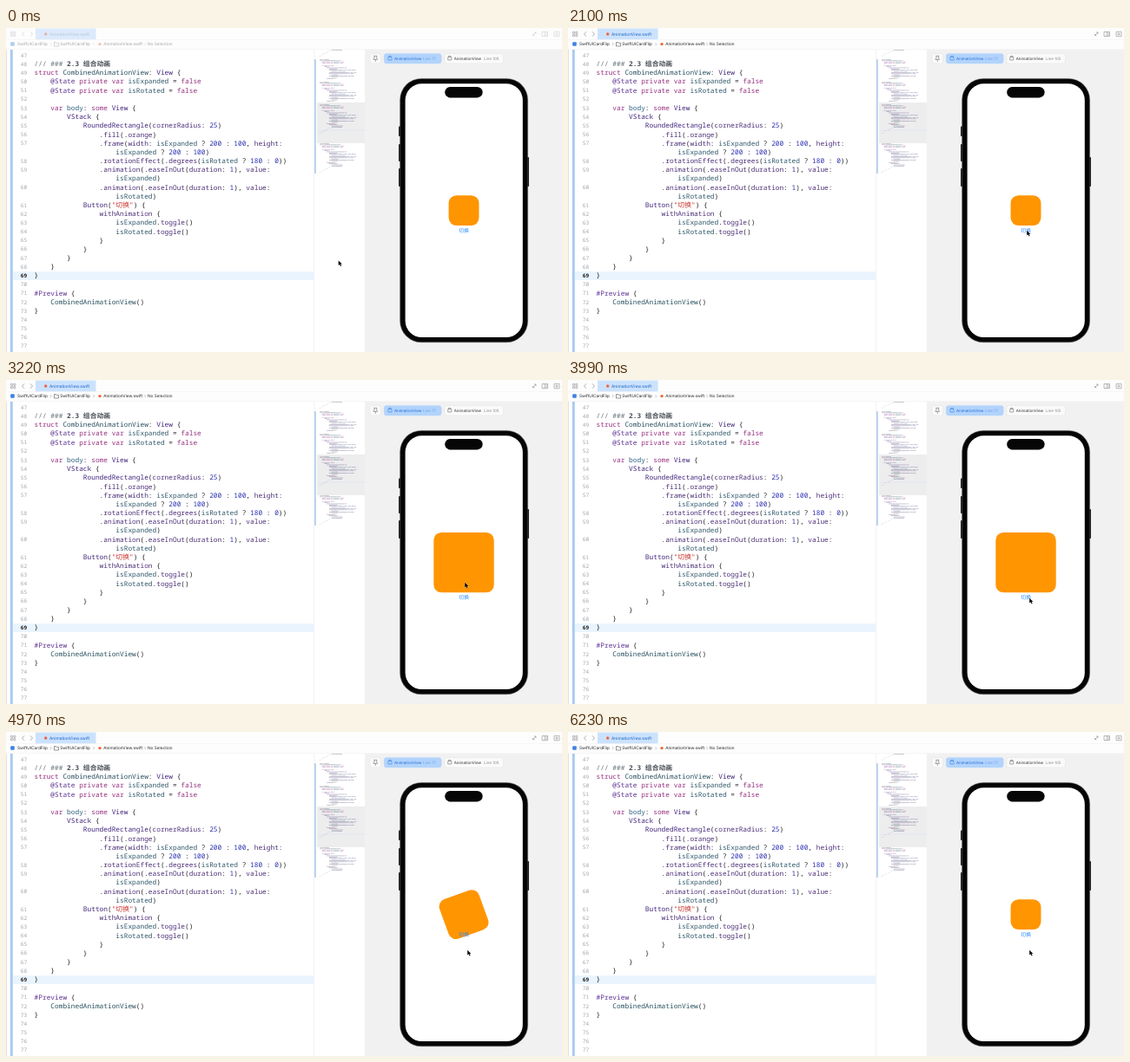
Write an HTML page that moves like this. It is 640 by 374 pixels and loops after 6.37 s.

```html
<!DOCTYPE html>
<html lang="en">
<head>
<meta charset="utf-8">
<title>Combined animation preview</title>
<style>
  html, body { margin: 0; width: 100%; height: 100%; overflow: hidden; background: #fff; }
  svg { display: block; width: 100%; height: 100%; }
  text { white-space: pre; text-rendering: geometricPrecision; }
  .ui { font-family: Inter, "Noto Sans CJK SC", sans-serif; }
  .code { font-family: "Noto Sans Mono", "Noto Sans CJK SC", monospace; }
</style>
</head>
<body>
<svg id="stage" viewBox="0 0 640 374"></svg>
<script>
const LOOP = 6370, STEP = 70, ACTIVATE = 910;
const EXPAND = 2210, COLLAPSE = 4405;
const ROW = 10.18, CODE_X = 32.6;

// A leading "~" marks a soft-wrapped continuation without a line number.
const SOURCE = `
/// ### 2.3 组合动画
struct CombinedAnimationView: View {
    @State private var isExpanded = false
    @State private var isRotated = false

    var body: some View {
        VStack {
            RoundedRectangle(cornerRadius: 25)
                .fill(.orange)
                .frame(width: isExpanded ? 200 : 100, height:
~                    isExpanded ? 200 : 100)
                .rotationEffect(.degrees(isRotated ? 180 : 0))
                .animation(.easeInOut(duration: 1), value:
~                    isExpanded)
                .animation(.easeInOut(duration: 1), value:
~                    isRotated)
            Button("切换") {
                withAnimation {
                    isExpanded.toggle()
                    isRotated.toggle()
                }
            }
        }
    }
}

#Preview {
    CombinedAnimationView()
}



`.split("\n");

const RULES = [
  [/^\/\/\/ ### /, "#68727b"],
  [/^2\.3 .*/, "#454d55", 600],
  [/^"[^"]*"/, "#c8302a"],
  [/^(struct|private|var|some|false)\b/, "#96317f", 500],
  [/^(@State|#Preview)/, "#5b3090"],
  [/^(View|VStack|RoundedRectangle|Button)\b/, "#42257c"],
  [/^CombinedAnimationView/, "#28505f"],
  [/^(isExpanded|isRotated)\b/, "#31596b"],
  [/^body\b/, "#2a5f80"],
  [/^(cornerRadius|width|height|duration|value|fill|orange|frame|rotationEffect|degrees|animation|easeInOut|withAnimation|toggle)\b/, "#4d3077"],
  [/^\d+/, "#2b2fb0"],
  [/^ +/, "none"],
  [/^./, "#222"]
];

function tokenize(line) {
  const tokens = [];
  for (let col = 0; col < line.length;) {
    const rest = line.slice(col);
    const [pattern, fill, weight] = RULES.find(([p]) => p.test(rest));
    const text = rest.match(pattern)[0];
    tokens.push({ text, fill, weight: weight || 400, col });
    col += text.length;
  }
  return tokens;
}

const stage = document.getElementById("stage");

function add(parent, name, attrs = {}, text) {
  const el = document.createElementNS("http://www.w3.org/2000/svg", name);
  for (const key in attrs) el.setAttribute(key, attrs[key]);
  if (text !== undefined) el.textContent = text;
  return parent.appendChild(el);
}
const group = (parent = stage) => add(parent, "g");
const box = (parent, x, y, width, height, fill, rx = 0, more = {}) =>
  add(parent, "rect", { x, y, width, height, fill, rx, ...more });
const label = (parent, x, y, size, fill, text, more = {}) =>
  add(parent, "text", { class: "ui", x, y, "font-size": size, fill, ...more }, text);
const line = (parent, d, stroke, width = 0.6) =>
  add(parent, "path", { d, stroke, "stroke-width": width, fill: "none" });

const rows = SOURCE.map(s => ({ wrapped: s[0] === "~", tokens: tokenize(s.replace("~", "")) }));

function drawEditor() {
  const g = group();
  box(g, 0, 0, 1, 374, "#dfe1e4");
  box(g, 4.8, 25, 3, 349, "#a9ccf1");
  box(g, 8, 281.2, 346, 9.8, "#e9f4fe");
  let number = 47;
  rows.forEach((row, i) => {
    const y = 31.2 + i * ROW;
    if (!row.wrapped) {
      const current = number === 69;
      add(g, "text", {
        class: "code", x: 24.2, y: y + 2.3, "font-size": 6.2, "text-anchor": "end",
        fill: current ? "#222" : "#a2a5a9", "font-weight": current ? 600 : 400
      }, number++);
    }
    const text = add(g, "text", { class: "code", x: CODE_X, y: y + 2.7, "font-size": 7.82 });
    for (const t of row.tokens)
      add(text, "tspan", { fill: t.fill, "font-weight": t.weight }, t.text);
  });
}

function drawMinimap() {
  const g = group();
  box(g, 354, 25, 0.6, 349, "#ebebeb");
  box(g, 355.2, 36, 1.5, 132, "#a5c6ea");
  box(g, 358, 86, 55, 47, "#ededee");
  box(g, 358, 117.6, 55, 1, "#e0e7ee");
  const block = (y, from, to) => rows.slice(from, to).forEach((row, i) => {
    for (const t of row.tokens)
      if (t.fill !== "none")
        box(g, 361 + t.col * 0.68, y + i * 1.37, t.text.length * 0.68, 0.75, t.fill, 0, { opacity: 0.38 });
  });
  block(25, 20, 27);
  block(36, 1, 18);
  block(62, 1, 18);
  block(88, 1, 26);
  block(133, 1, 26);
}

function drawToolbar() {
  box(stage, 0, 0, 640, 24.5, "#fdfdfd");
  const tab = box(stage, 34, 0.5, 69.5, 12.8, "#cbe2fd");
  box(stage, 0, 13.2, 640, 0.4, "#eaeaea");
  box(stage, 0, 24.2, 640, 0.4, "#e8e8e8");
  const g = group();
  const grey = "#777";
  const title = label(g, 50, 8.8, 4.9, "#1d64c4", "AnimationView.swift");
  add(g, "circle", { cx: 45.7, cy: 7, r: 1.7, fill: "#f0643c" });
  for (const [x, y] of [[5.5, 4.3], [8.8, 4.3], [5.5, 7.6], [8.8, 7.6]])
    box(g, x, y, 2.1, 2.1, "none", 0.3, { stroke: grey, "stroke-width": 0.5 });
  line(g, "M21 4.3L18.5 7L21 9.7M28 4.3L30.5 7L28 9.7", grey);
  line(g, "M606.5 8.5L610 5M608 5H610V7M606.5 6.8V8.5H608.4", grey, 0.5);
  line(g, "M617 4.5H623.5V9.5H617ZM620.2 4.5V9.5M621 6H623M621 8H623", grey, 0.5);
  line(g, "M631 4.3H637V9.7H631ZM634 5.2V8.8M632.2 7H635.8", grey, 0.5);

  box(g, 5.2, 16.2, 4.6, 4.6, "#3c82e0", 1);
  add(g, "path", { d: "M55.5 16.5h2l.7.8h2.3v3.7h-5z", fill: "none", stroke: "#555", "stroke-width": 0.6 });
  add(g, "circle", { cx: 108, cy: 18.6, r: 1.7, fill: "#f0643c" });
  const crumbs = [[13, "SwiftUICardFlip"], [62.2, "SwiftUICardFlip"], [112.2, "AnimationView.swift"], [163, "No Selection"]];
  for (const [x, text] of crumbs) label(g, x, 20.2, 4.75, "#262626", text);
  for (const x of [51, 100.5, 159.5]) line(g, `M${x} 17l1.3 1.6l-1.3 1.6`, "#888", 0.5);
  return { g, tab, title };
}

function drawPreview() {
  box(stage, 413, 24.7, 227, 350, "#f1f1f1");
  const g = group();
  const cube = (x, color) =>
    line(g, `M${x} 33.5h4v3.5h-4zM${x + 0.9} 33.5v-1.2h2.2v1.2`, color, 0.5);
  const pill = (x, width, fill, stroke) =>
    box(g, x, 29.6, width, 11.4, fill, 3, { stroke, "stroke-width": 0.4 });

  pill(418.7, 13, "#fafafa", "#dcdcdc");
  line(g, "M423.3 32.3h4M424 32.3v2.7l-1.2 1.3h5l-1.2-1.3v-2.7M425.3 36.3v2.7", "#555", 0.5);
  pill(435.2, 66, "#b2d3fc", "#b2d3fc");
  cube(440, "#2374de");
  label(g, 447, 36.9, 4.5, "#1f6fd8", "AnimationView");
  label(g, 480, 36.9, 4.5, "#6ba3e8", "Line 71");
  pill(504.7, 68, "#fafafa", "#dcdcdc");
  cube(508.7, "#555");
  label(g, 515.7, 36.9, 4.5, "#333", "AnimationView");
  label(g, 550, 36.9, 4.5, "#8a8a8a", "Line 105");

  for (const [x, y, h] of [[452, 113.5, 11.5], [452, 134, 20], [452, 162, 21], [599.8, 149, 34]])
    box(g, x, y, 2.2, h, "#222", 0.8);
  box(g, 453.6, 58.4, 147, 304.4, "#111", 24.5, { stroke: "#4a4c4f", "stroke-width": 0.4 });
  box(g, 454.8, 59.6, 144.6, 302, "#050505", 23.3);
  box(g, 459.6, 64.3, 135.2, 292.8, "#fff", 19);
  box(g, 505.2, 68, 43.4, 12.4, "#060606", 6.2);
}

drawEditor();
drawMinimap();
drawPreview();
const toolbar = drawToolbar();

const square = add(stage, "rect", { fill: "#ff9500", rx: 9 });
const button = label(stage, 527, 0, 6, "#2a8bff", "切换", { "text-anchor": "middle" });
const cursor = add(stage, "path", {
  d: "M0 0V5.7L1.4 4.5L2.4 6.6L3.4 6.1L2.4 4.1H4.1Z",
  fill: "#000", stroke: "#fff", "stroke-width": 0.5, "paint-order": "stroke"
});

const clamp = v => Math.min(1, Math.max(0, v));
const mix = (a, b, k) => a + (b - a) * k;
const smooth = s => s * s * (3 - 2 * s);

// cubic-bezier(.42, 0, .58, 1)
function easeInOut(x) {
  x = clamp(x);
  let lo = 0, hi = 1;
  for (let i = 0; i < 24; i++) {
    const s = (lo + hi) / 2, r = 1 - s;
    if (1.26 * s * r * r + 1.74 * s * s * r + s * s * s < x) lo = s; else hi = s;
  }
  return smooth((lo + hi) / 2);
}

// Critically damped, 0.55 s response
function spring(seconds) {
  const w = Math.max(0, seconds) * 2 * Math.PI / 0.55;
  return 1 - (1 + w) * Math.exp(-w);
}

const toggled = (ease, t) => ease((t - EXPAND) / 1000) - ease((t - COLLAPSE) / 1000);

const MOVES = [
  { from: 280, to: 770, x: 535.3, y: 248.8 },
  { from: 1540, to: 2100, x: 528.2, y: 233.8 },
  { from: 3570, to: 3990, x: 531.2, y: 251.8 }
];

function cursorAt(t) {
  let x = 382.7, y = 268.4;
  for (const m of MOVES) {
    const k = smooth(clamp((t - m.from) / (m.to - m.from)));
    x = mix(x, m.x, k);
    y = mix(y, m.y, k);
  }
  return [x, y];
}

function render(t) {
  const active = t >= ACTIVATE;
  toolbar.g.setAttribute("opacity", active ? 1 : 0.4);
  toolbar.tab.setAttribute("fill", active ? "#cbe2fd" : "#dceafc");
  toolbar.title.setAttribute("fill", active ? "#1d64c4" : "#7c8ea6");

  const p = toggled(easeInOut, t);
  const size = mix(34.9, 69.4, p);
  square.setAttribute("width", size);
  square.setAttribute("height", size);
  square.setAttribute("transform", `translate(527 210.6) rotate(${180 * p}) translate(${-size / 2} ${-size / 2})`);
  button.setAttribute("y", mix(235.8, 253.1, toggled(spring, t)));
  cursor.setAttribute("transform", `translate(${cursorAt(t)})`);
}

const start = performance.now();
function tick() {
  const t = (performance.now() - start) % LOOP;
  render(Math.floor(t / STEP) * STEP);
  requestAnimationFrame(tick);
}
tick();
</script>
</body>
</html>
```
